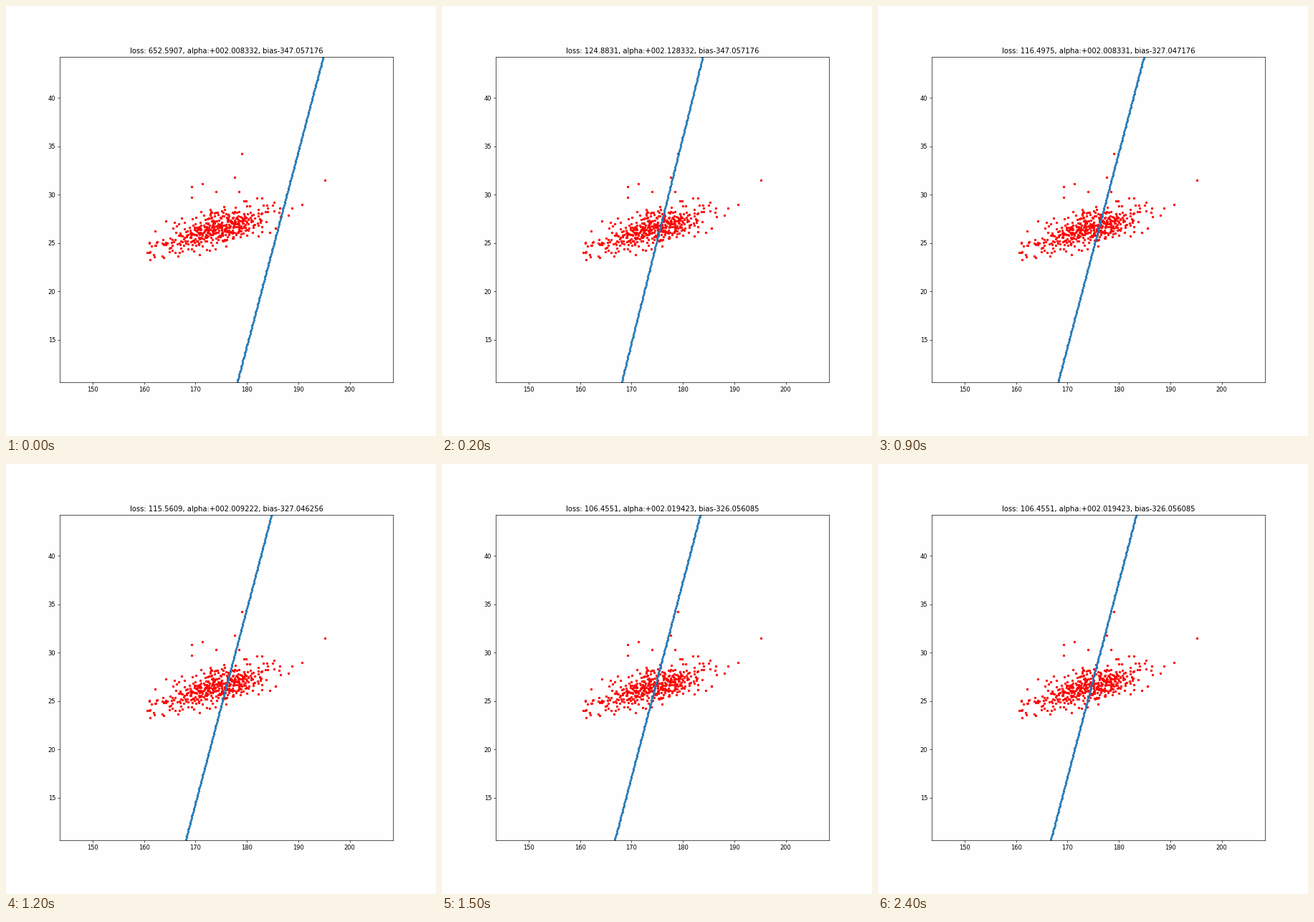
Write a matplotlib script that moves like this. It is 600 px wide and 600 px high and loops after 2.5 s.

```python
import numpy as np
import matplotlib.pyplot as plt
from matplotlib.animation import FuncAnimation

DPI = 60
FRAMES = 25
PAPER = "#fefefe"

# first frame: (loss, slope, bias); each fit holds until a better one is found
FITS = {
    0: (652.5907, 2.008332, -347.057176),
    1: (124.8831, 2.128332, -347.057176),
    4: (116.4975, 2.008331, -327.047176),
    11: (115.5609, 2.009222, -327.046256),
    14: (106.4551, 2.019423, -326.056085),
}

OUTLIERS = [(160.6, 24.05), (169.3, 30.8), (169.2, 29.7), (171.4, 31.1),
            (174.0, 30.3), (177.6, 31.8), (179.0, 34.2), (178.5, 30.3),
            (190.7, 29.0), (195.1, 31.5)]


def cloud(count):
    """Seeded points scattered around a gentle upward trend."""
    rng = np.random.default_rng(12)
    x = rng.normal(174, 5.4, count).clip(161, 189)
    y = 26.45 + 0.13 * (x - 174) + rng.normal(0, 0.88, count).clip(-2.4, 2.2)
    return x, y


plt.rcParams["font.family"] = "DejaVu Sans"
fig = plt.figure(figsize=(10, 10), dpi=DPI, facecolor=PAPER)
ax = fig.add_axes([0.125, 0.125, 0.775, 0.756], facecolor=PAPER)
ax.set_xlim(143.6, 208.4)
ax.set_ylim(10.63, 44.19)

ax.plot(*cloud(450), "r.")
ax.plot(*zip(*OUTLIERS), "r.")

xs = np.arange(160, 200, 0.1)
fit_line, = ax.plot([], [], "C0.")
title = ax.set_title("")


def update(frame):
    start = max(first for first in FITS if first <= frame)
    loss, slope, bias = FITS[start]
    fit_line.set_data(xs, slope * xs + bias)
    title.set_text(f"loss: {loss:.4f}, alpha:{slope:+011.6f}, bias{bias:+.6f}")
    return fit_line, title


anim = FuncAnimation(fig, update, frames=FRAMES, interval=100, repeat=True,
                     repeat_delay=0, blit=False)
plt.show()
```
